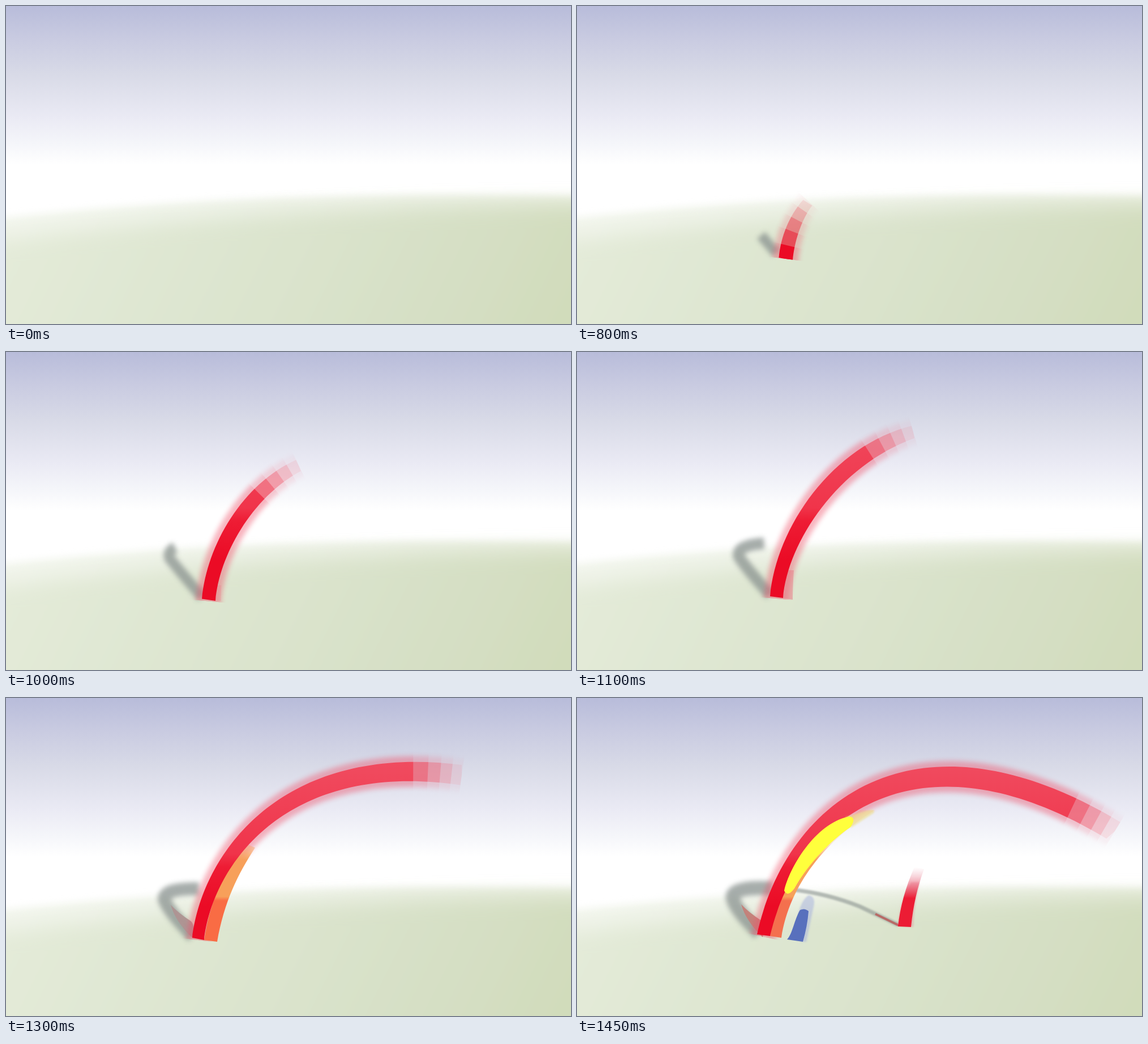
These frames come from a looping animation (998x561 px, 1500 ms). An HTML page without scripts:

```html
<!DOCTYPE html>
<html lang="en">
<head>
<meta charset="utf-8">
<title>Growing rainbow</title>
<style>
  html, body { margin: 0; width: 100%; height: 100%; overflow: hidden; background: #fff; }
  svg { display: block; width: 100vw; height: 100vh; }

  /* Everything advances in 50 ms steps within a 1.5 s loop. */
  .anim { animation: 1.5s steps(4) infinite; }
  .spine { animation-name: spine; fill: none; stroke-width: 84; }
  .red { animation-name: red; }
  .strand { animation-name: strand; }
  .low { animation-name: low; }
  .high { animation-name: high; }
  .shade { animation-name: shade, shade-length; }
  .streak { animation-name: streak; }
  .tail { animation-name: tail; }
  .grow { animation-name: grow; }
  .bow { animation-name: bow; }
  .seed { animation-name: seed; }

  @keyframes bow { 0% { opacity: 0; animation-timing-function: step-end } 46.66%, 100% { opacity: 1 } }
  @keyframes seed {
    0%, 49.99% { opacity: 0; animation-timing-function: step-end }
    46.66% { opacity: .65; animation-timing-function: step-end }
    100% { opacity: 0 }
  }
  /* Centre line, from the tip back to the foot. */
  @keyframes spine {
    0%, 46.66% { d: path("M382 434C380 437 377 441 374 448") }
    59.99% { d: path("M440 259C396 306 369 378 363 444") }
    73.33% { d: path("M594 141C456 182 362 322 352 435"); animation-timing-function: steps(2) }
    79.99% { d: path("M690 124C481 136 360 302 346 431"); animation-timing-function: steps(2) }
    86.66% { d: path("M805 136C495 93 357 280 339 427"); animation-timing-function: steps(3) }
    96.66%, 100% { d: path("M950 235C595 20 377 202 329 421") }
  }
  @keyframes red {
    0%, 46.66% { d: path("M362 448C362 445 363 440 365 434L385 436C386 442 386 450 386 454Z") }
    59.99% { d: path("M351 440C358 370 386 300 434 250L446 268C406 312 381 385 376 444Z") }
    73.33% { d: path("M341 431C352 310 450 165 592 130L596 152C462 200 372 335 364 434Z"); animation-timing-function: steps(2) }
    79.99% { d: path("M335 427C350 290 474 120 690 110L690 138C488 152 370 315 357 431Z"); animation-timing-function: steps(2) }
    86.66% { d: path("M329 423C348 270 490 78 805 118L805 154C500 108 366 290 350 427Z"); animation-timing-function: steps(3) }
    96.66%, 100% { d: path("M318 417C370 180 600 0 965 222L935 248C590 40 385 225 341 420Z") }
  }
  @keyframes strand {
    0%, 59.99% { d: path("M370 440C370 440 370 439 371 438L378 438C378 439 378 440 378 441Z"); opacity: 0 }
    73.33% { d: path("M364 434C367 415 368 400 372 385L383 385C382 400 381 420 381 437Z"); opacity: .5; animation-timing-function: steps(2) }
    79.99% { d: path("M357 431C360 405 366 380 384 336L399 334C395 365 386 395 380 434Z"); opacity: .95; animation-timing-function: steps(2) }
    86.66% { d: path("M350 427C358 375 375 315 426 258L440 264C410 310 385 360 373 430Z"); opacity: 1; animation-timing-function: steps(3) }
    96.66%, 100% { d: path("M341 420C352 360 385 280 500 198L526 198C440 250 375 330 361 423Z"); opacity: 1 }
  }
  @keyframes low {
    0%, 73.33% { stop-color: #e97885; animation-timing-function: steps(2) }
    79.99% { stop-color: #f04858; animation-timing-function: steps(2) }
    86.66% { stop-color: #f96c44; animation-timing-function: steps(3) }
    96.66%, 100% { stop-color: #f4704e }
  }
  @keyframes high {
    0%, 73.33% { stop-color: #e97885; animation-timing-function: steps(2) }
    79.99% { stop-color: #f0685f; animation-timing-function: steps(2) }
    86.66%, 100% { stop-color: #f7a05a }
  }
  @keyframes shade {
    0%, 59.99% { d: path("M352 436C328 408 308 384 292 366C286 350 300 342 330 338"); stroke-width: 18px; animation-timing-function: steps(11) }
    96.66%, 100% { d: path("M322 415C300 392 278 370 275 352C275 336 310 334 345 336"); stroke-width: 25px }
  }
  @keyframes shade-length {
    0%, 46.66% { stroke-dasharray: 0 900 }
    59.99% { stroke-dasharray: 82 900; animation-timing-function: steps(6) }
    79.99%, 100% { stroke-dasharray: 175 900 }
  }
  @keyframes streak {
    0%, 73.33% { fill: #a0a798; opacity: 0; animation-timing-function: steps(2) }
    79.99% { fill: #a0a798; opacity: .9; animation-timing-function: steps(2) }
    86.66% { fill: #ae9392; opacity: .95; animation-timing-function: steps(3) }
    96.66%, 100% { fill: #c47f78; opacity: .95; transform: translate(-2px, -2px) }
  }
  @keyframes tail {
    0%, 86.66% { stroke-dasharray: 0 900; animation-timing-function: steps(3) }
    96.66%, 100% { stroke-dasharray: 215 900 }
  }
  @keyframes grow {
    0%, 86.66% { transform: scale(0); animation-timing-function: steps(3) }
    96.66%, 100% { transform: none }
  }
</style>
</head>
<body>
<svg viewBox="0 0 998 561" preserveAspectRatio="none">
  <defs>
    <linearGradient id="sky" gradientUnits="userSpaceOnUse" x2="0" y2="280">
      <stop stop-color="#b8bcda"/>
      <stop offset=".21" stop-color="#c9cbe1"/>
      <stop offset=".43" stop-color="#d8dae7"/>
      <stop offset=".7" stop-color="#eaeaf4"/>
      <stop offset=".87" stop-color="#f5f6fa"/>
      <stop offset="1" stop-color="#fff"/>
    </linearGradient>
    <linearGradient id="grass" gradientUnits="userSpaceOnUse" x1="0" y1="400" x2="900" y2="850">
      <stop stop-color="#e4ebd9"/>
      <stop offset=".5" stop-color="#dae3cc"/>
      <stop offset=".8" stop-color="#d4dec2"/>
      <stop offset="1" stop-color="#d0dbb8"/>
    </linearGradient>
    <linearGradient id="redPaint" gradientUnits="userSpaceOnUse" x1="0" y1="110" x2="0" y2="440">
      <stop stop-color="#f04c60"/>
      <stop offset=".5" stop-color="#f0344a"/>
      <stop offset=".57" stop-color="#ee1c34"/>
      <stop offset=".78" stop-color="#eb0b25"/>
    </linearGradient>
    <linearGradient id="strandPaint" gradientUnits="userSpaceOnUse" x1="0" y1="255" x2="0" y2="435">
      <stop class="anim high" stop-opacity=".2"/>
      <stop class="anim high" offset=".17"/>
      <stop class="anim high" offset=".53"/>
      <stop class="anim low" offset=".57"/>
    </linearGradient>
    <linearGradient id="spikePaint" x2="0" y2="1">
      <stop stop-color="#e8a0b0" stop-opacity="0"/>
      <stop offset=".3" stop-color="#e8526a" stop-opacity=".6"/>
      <stop offset=".52" stop-color="#ec1c34"/>
    </linearGradient>
    <filter id="haze" filterUnits="userSpaceOnUse" x="-100" y="200" width="1200" height="500"><feGaussianBlur stdDeviation="7"/></filter>
    <filter id="mist" filterUnits="userSpaceOnUse" x="-100" y="200" width="1200" height="500"><feGaussianBlur stdDeviation="17"/></filter>
    <filter id="soft" filterUnits="userSpaceOnUse" x="0" y="0" width="998" height="561"><feGaussianBlur stdDeviation="4"/></filter>
    <filter id="smooth" filterUnits="userSpaceOnUse" x="0" y="0" width="998" height="561"><feGaussianBlur stdDeviation="1.6"/></filter>
    <mask id="fade" maskUnits="userSpaceOnUse" x="0" y="0" width="998" height="561">
      <path class="anim spine" stroke="#222"/>
      <path class="anim spine" stroke="#484848" stroke-dasharray="0 18 2000"/>
      <path class="anim spine" stroke="#787878" stroke-dasharray="0 38 2000"/>
      <path class="anim spine" stroke="#b4b4b4" stroke-dasharray="0 60 2000"/>
      <path class="anim spine" stroke="#fff" stroke-dasharray="0 86 2000"/>
    </mask>
  </defs>

  <rect width="998" height="561" fill="url(#sky)"/>
  <g fill="url(#grass)">
    <path filter="url(#haze)" opacity=".5" d="M-80 382C250 345 560 324 1080 338V660H-80Z"/>
    <path filter="url(#mist)" d="M-80 420C250 382 560 350 1080 350V660H-80Z"/>
  </g>

  <path class="anim seed" fill="#cdc5b3" filter="url(#smooth)" d="M362 446L367 432L385 436L386 454L374 453Z"/>

  <g class="anim bow">
    <g fill="none" stroke="#89928f">
      <path class="anim shade" filter="url(#soft)" opacity=".75"/>
      <path class="anim tail" filter="url(#smooth)" opacity=".6" stroke-width="7" d="M380 338C425 343 465 354 500 368L567 400"/>
    </g>
    <path class="anim streak" d="M292 366Q300 395 330 424Q336 405 328 395Q305 380 292 366Z"/>

    <g mask="url(#fade)">
      <path class="anim red" fill="none" stroke="#ef5068" stroke-width="20" opacity=".42" filter="url(#soft)"/>
      <path class="anim strand" fill="url(#strandPaint)"/>
      <path class="anim red" fill="url(#redPaint)"/>
    </g>

    <g class="anim grow" style="transform-origin:372px 345px">
      <path fill="#eee08a" opacity=".6" filter="url(#smooth)" d="M474 210L512 199Q528 194 524 203L484 229Z"/>
      <path fill="#ffff3c" d="M366 340C375 300 420 222 480 209Q495 210 483 228C450 250 410 290 384 336Q372 352 366 340Z"/>
    </g>

    <g class="anim grow" style="transform-origin:385px 429px">
      <path fill="#a9b4dc" opacity=".55" filter="url(#smooth)" d="M391 380Q397 356 409 348Q422 350 418 368L405 430H396Z"/>
      <path fill="#5870bd" d="M371 426C381 416 384 390 394 374Q402 370 409 376Q407 402 399 430Z"/>
    </g>

    <g class="anim grow" style="transform-origin:578px 404px">
      <path fill="none" stroke="#b86a66" stroke-width="4" d="M527 381L568 401"/>
      <path fill="#e8657a" opacity=".3" filter="url(#smooth)" d="M566 402C570 370 578 345 590 325L605 325C598 355 595 375 594 404Z"/>
      <path fill="url(#spikePaint)" d="M567 403C571 368 580 335 596 298L613 302C601 335 594 365 590 404Z"/>
    </g>
  </g>
</svg>
</body>
</html>
```
